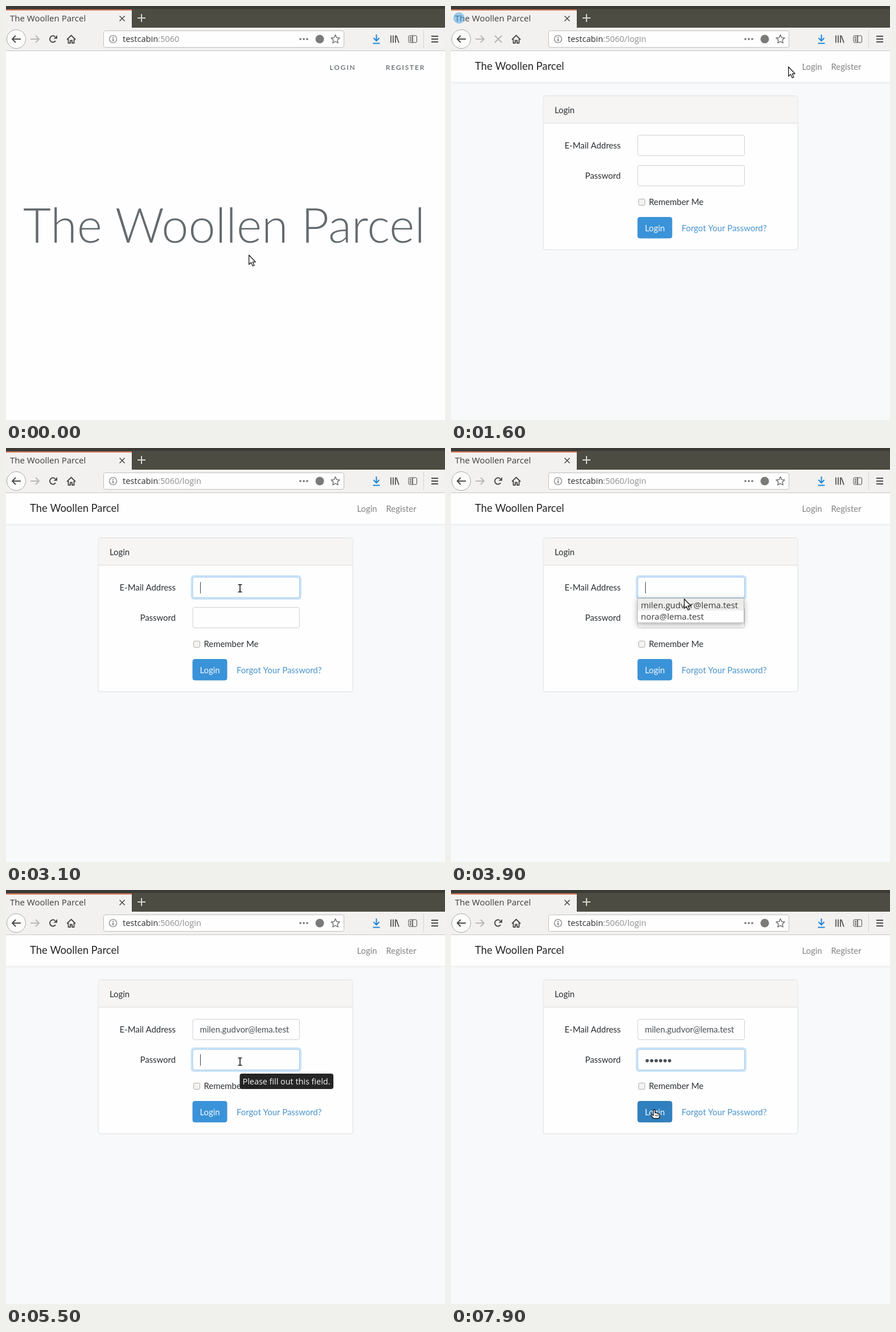
Recreate the animation shown at these times as an HTML page with a canvas. Size 771 by 726 pixels, loop 8000 ms.

```html
<!DOCTYPE html>
<html lang="en">
<head>
<meta charset="utf-8">
<title>Portal login</title>
<style>
  html, body { margin: 0; width: 100%; height: 100%; overflow: hidden; background: #fefefe; }
  canvas { display: block; }
</style>
</head>
<body>
<canvas id="stage" width="771" height="726"></canvas>
<script>
const ctx = document.getElementById('stage').getContext('2d');
const LOOP = 8000, STEP = 100;

const SITE = 'The Woollen Parcel';
const HOST = 'testcabin', PORT = ':5060', PATH = '/login';
const EMAILS = ['milen.gudvor@lema.test', 'nora@lema.test'];

const ui = size => size + 'px "Open Sans", sans-serif';
const BODY = '14.9px Lato, sans-serif';
const INK = '#4c4c4a', DARK = '#2b2f33', BLUE = '#3a93d8';

// Moments in the story, in ms
const T = {
  hover: 1100, click: 1300, loaded: 1500, burst: 1600, reload: 2300,
  emailFocus: 2900, list: 3500, pick: 3900, filled: 4200,
  passFocus: 4600, tip: 5500, typed: 5600, leave: 7300, button: 7700
};
const KEY_TIMES = [5600, 5800, 6000, 6000, 6300, 6300];

// time, x, y, pointer shape
const POINTER = [
  [0, 427, 437, 'arrow'], [300, 427, 437, 'arrow'], [600, 458, 375, 'arrow'],
  [900, 552, 185, 'arrow'], [1100, 590, 112, 'hand'], [1200, 593, 107, 'hand'],
  [1500, 593, 107, 'arrow'], [2200, 593, 107, 'arrow'], [2300, 540, 150, 'arrow'],
  [2400, 459, 222, 'arrow'], [2500, 418, 242, 'beam'], [2600, 411, 246, 'beam'],
  [3500, 411, 246, 'arrow'], [3700, 411, 246, 'arrow'], [3900, 410, 265, 'arrow'],
  [4100, 411, 274, 'arrow'], [4400, 411, 274, 'arrow'], [4500, 411, 292, 'beam'],
  [4900, 411, 292, 'beam'], [5000, 411, 301, 'beam'], [7200, 411, 301, 'beam'],
  [7300, 416, 300, 'arrow'], [7500, 402, 328, 'arrow'], [7700, 368, 373, 'hand'],
  [7900, 357, 386, 'hand']
];

const clamp = v => Math.max(0, Math.min(1, v));

function text(str, x, y, font, color, align = 'left', spacing = 0) {
  ctx.font = font;
  ctx.fillStyle = color;
  ctx.textAlign = align;
  ctx.letterSpacing = spacing + 'px';
  ctx.fillText(str, x, y);
  ctx.letterSpacing = '0px';
  return ctx.measureText(str).width;
}

function rect(x, y, w, h, fill) {
  ctx.fillStyle = fill;
  ctx.fillRect(x, y, w, h);
}

function box(x, y, w, h, r, fill, stroke) {
  ctx.beginPath();
  ctx.roundRect(x, y, w, h, r);
  paint(fill, stroke, 1);
}

function disc(x, y, r, fill, stroke, width = 1) {
  ctx.beginPath();
  ctx.arc(x, y, r, 0, Math.PI * 2);
  paint(fill, stroke, width);
}

function paint(fill, stroke, width) {
  if (fill) { ctx.fillStyle = fill; ctx.fill(); }
  if (stroke) { ctx.strokeStyle = stroke; ctx.lineWidth = width; ctx.stroke(); }
}

// Draws an SVG path at an offset
function shape(d, x, y, fill, stroke, width = 1) {
  ctx.save();
  ctx.translate(x, y);
  const path = new Path2D(d);
  ctx.lineJoin = 'round';
  if (fill) { ctx.fillStyle = fill; ctx.fill(path); }
  if (stroke) { ctx.strokeStyle = stroke; ctx.lineWidth = width; ctx.stroke(path); }
  ctx.restore();
}

function drawTabs(t) {
  rect(0, 0, 771, 6, '#3b3a35');
  rect(0, 5, 771, 33, '#4d4c43');
  rect(0, 6, 221, 32, '#f2f1f0');
  rect(0, 6, 221, 2, '#d9785c');
  rect(221, 6, 1, 32, '#3b3a35');
  const loading = t >= T.click && t < T.loaded;
  text(SITE, loading ? 31 : 7, 27, ui(15), '#3d3d3b');
  if (loading) disc(t === T.click ? 10 : 18, 21, 3, '#8a8a88');
  const age = t - T.burst;
  if (age >= 0 && age < 200) {
    ctx.globalAlpha = age ? 0.18 : 0.5;
    disc(14, 21, age ? 14 : 10, '#3f9fe6');
    ctx.globalAlpha = 1;
  }
  shape('M-4.5-4.5 4.5 4.5M4.5-4.5-4.5 4.5', 204, 22, null, INK, 1.6);
  shape('M-7 0H7M0-7V7', 238, 21, null, '#d8d7d2', 2);
}

function drawReload(t) {
  if (t >= T.click && t < T.reload) {
    shape('M-6-6 6 6M6-6-6 6', 83, 58, null, '#b4b3b1', 2);
    return;
  }
  shape('M4.6 3.2A5.6 5.6 0 1 1 3.8-4.2', 82.5, 58, null, INK, 2);
  shape('M7.5-7V-.5H1Z', 82.5, 58, INK);
}

function drawToolbar(t) {
  rect(0, 38, 771, 40, '#f2f1ef');
  rect(0, 78, 771, 1, '#c6c5c3');
  disc(18, 58, 16.5, '#fcfcfb', '#a9a8a6');
  const arrow = 'M8 0H-7M-1-6-7 0-1 6';
  shape(arrow, 18, 58, null, INK, 2);
  ctx.save();
  ctx.scale(-1, 1);
  shape(arrow, -51, 58, null, '#b9b8b6', 2);
  ctx.restore();
  drawReload(t);
  shape('M-7.5 1 0-6.5 7.5 1M-5 0V7H-1.5V2.5H1.5V7H5V0', 114.5, 58, null, INK, 1.9);

  box(171.5, 43.5, 422, 29, 3, '#fefefe', '#bfbebc');
  disc(188, 58, 6.5, null, '#777675', 1.2);
  rect(187.2, 57, 1.7, 5, '#777675');
  rect(187.2, 54, 1.7, 1.8, '#777675');
  const width = text(HOST, 205, 63, ui(14.6), '#2e2e2c');
  text(PORT + (t >= T.click ? PATH : ''), 205 + width, 63, ui(14.6), '#8d8d8b');
  for (const x of [517, 523, 529]) disc(x, 58, 1.8, '#6f6e6d');
  disc(551, 58, 7.5, '#7b7a79');
  shape('M0-7.5 2.2-2.6 7.5-2 3.6 1.6 4.6 6.8 0 4.2-4.6 6.8-3.6 1.6-7.5-2-2.2-2.6Z',
    578.5, 58, null, '#747372', 1.5);

  shape('M0-8V3M-5-2 0 3.3 5-2M-6 7.5H6', 650.5, 58, null, '#1f86dc', 2);
  shape('M-6-6.5V6.5M-2-6.5V6.5M2-6.5V6.5M3.5-6 8 6.5', 682, 58, null, INK, 1.7);
  box(707, 52, 14.5, 12, 2, null, INK);
  shape('M0-6V6M-5-3H-2M-5 0H-2M-5 3H-2', 714, 58, null, INK, 1.6);
  rect(733, 42, 1, 32, '#d5d4d2');
  shape('M-6-5H6M-6 0H6M-6 5H6', 753, 58, null, INK, 1.9);
}

function drawHome(t) {
  rect(0, 79, 771, 647, '#fefefe');
  const small = '600 12px Lato, sans-serif', gray = '#636b6f';
  text('LOGIN', 568.5, 112, small, gray, 'left', 1.8);
  text('REGISTER', 667, 112, small, gray, 'left', 1.8);
  text(SITE, 30, 415, '300 84.5px Lato, sans-serif', gray);
  if (t >= T.hover) {
    box(-1.5, 705.5, 161, 22, [0, 3, 0, 0], '#f2f1f0', '#c6c5c3');
    text(HOST + PORT + PATH, 5, 721, ui(14.6), '#5a5a58');
  }
}

function drawField(y, focus) {
  if (focus > 0) {
    ctx.globalAlpha = focus;
    box(324.5, y - 3, 194.5, 43, 6, '#cce3f6');
    ctx.globalAlpha = 1;
  }
  box(328, y + .5, 187.5, 36, 3.5, '#fefefe', focus > .3 ? '#a1cbef' : '#cdd0d3');
}

function caret(x, y) {
  rect(x, y, 1, 20, '#3c4043');
}

function drawEmail(t) {
  const blur = clamp((t - T.passFocus + 60) / 160);
  const focus = clamp((t - T.emailFocus + 60) / 160) - blur;
  drawField(226, focus);
  if (t >= T.filled) {
    const width = text(EMAILS[0], 340.5, 250, BODY, '#495057');
    if (t < T.passFocus) caret(341 + Math.round(width), 235);
  } else if (t >= T.emailFocus + 200) {
    caret(341, 235);
  }
}

function drawPassword(t) {
  drawField(279, clamp((t - T.passFocus + 60) / 160));
  const count = KEY_TIMES.filter(k => t >= k).length;
  for (let i = 0; i < count; i++) disc(344.6 + i * 7.85, 299.3, 2.9, '#495057');
  if (t >= T.passFocus + 100 && t < T.leave) caret(341 + Math.round(count * 7.85), 288);
}

function drawLogin(t) {
  rect(0, 79, 771, 647, '#f7f9fb');
  ctx.save();
  ctx.shadowColor = 'rgba(0,0,0,.06)';
  ctx.shadowBlur = 4;
  ctx.shadowOffsetY = 2;
  rect(0, 79, 771, 54, '#fefefe');
  ctx.restore();
  text(SITE, 42, 112, '18.4px Lato, sans-serif', '#262626');
  text('Login', 616.5, 112, BODY, '#838382');
  text('Register', 667.5, 112, BODY, '#838382');

  box(162, 157.5, 447, 270, 4, '#fefefe', '#dcdddd');
  box(162.5, 158, 446, 48, [3, 3, 0, 0], '#f6f5f4');
  rect(162, 205, 447, 1, '#dcdddd');
  text('Login', 182, 187.5, BODY, DARK);
  text('E-Mail Address', 298, 250, BODY, DARK, 'right');
  text('Password', 298, 303, BODY, DARK, 'right');
  drawEmail(t);
  drawPassword(t);

  box(329.5, 338.5, 11, 11, 2, '#f4f3f2', '#aeadab');
  text('Remember Me', 347.5, 349, BODY, DARK);
  const hot = t >= T.button;
  box(328, 370.5, 60, 36.5, 3.5, hot ? '#3080bf' : BLUE, hot ? '#2a75b0' : '#3a8fd2');
  text('Login', 340.5, 395, BODY, '#f4f8fb');
  text('Forgot Your Password?', 405, 395, BODY, '#4a94cc');

  if (t >= T.list && t < T.filled) drawList(t);
  if (t >= T.tip && t < T.typed) {
    box(410.5, 322, 164.5, 27, 4, 'rgba(26,26,26,.95)');
    text('Please fill out this field.', 415.5, 341, ui(14.4), '#f4f4f4');
  }
}

function drawList(t) {
  ctx.save();
  ctx.shadowColor = 'rgba(0,0,0,.3)';
  ctx.shadowBlur = 10;
  ctx.shadowOffsetY = 3;
  rect(327, 263, 188, 43.5, '#fefefe');
  ctx.restore();
  box(327.5, 263.5, 187, 43, 0, '#fefefe', '#bab9b7');
  if (t >= T.pick) rect(328, 264, 186, 21, '#ededec');
  EMAILS.forEach((mail, i) => text(mail, 333.5, 280.5 + i * 20.5, ui(15), '#3c3c3a'));
}

const pointers = {
  arrow(x, y) {
    shape('M0 0V16.5L3.8 13 6.6 19.2 9.3 18 6.6 12H11.5Z', x - .3, y - .2, '#fefefe', '#1a1a1a', 1.3);
  },
  beam(x, y) {
    const d = 'M-3.5-6.5H-1.2L0-5.8 1.2-6.5H3.5M0-6V6M-3.5 6.5H-1.2L0 5.8 1.2 6.5H3.5';
    shape(d, x, y, null, '#fefefe', 3.4);
    shape(d, x, y, null, '#1a1a1a', 1.6);
  },
  hand(x, y) {
    shape('M-1.5 0Q0-2 1.5 0V5Q3.5 4 4.6 5.6 6.5 5 7.3 6.6 9.3 6.2 9.5 8V11L8 14.5H-1.5' +
      'L-5.5 9.5Q-6.2 7.5-4 7.5L-1.5 9.5Z', x, y, '#fefefe', '#1a1a1a', 1.4);
    shape('M2 8V11M4.5 8V11M7 8V11', x, y, null, '#1a1a1a', 1);
  }
};

function drawPointer(t) {
  const i = POINTER.findLastIndex(k => k[0] <= t);
  const a = POINTER[i], b = POINTER[i + 1] || a;
  const p = b === a ? 0 : (t - a[0]) / (b[0] - a[0]);
  pointers[a[3]](a[1] + (b[1] - a[1]) * p, a[2] + (b[2] - a[2]) * p);
}

function frame(now) {
  const t = Math.floor((now % LOOP) / STEP) * STEP;
  (t < T.loaded ? drawHome : drawLogin)(t);
  drawTabs(t);
  drawToolbar(t);
  drawPointer(t);
  requestAnimationFrame(frame);
}
requestAnimationFrame(frame);
</script>
</body>
</html>
```
